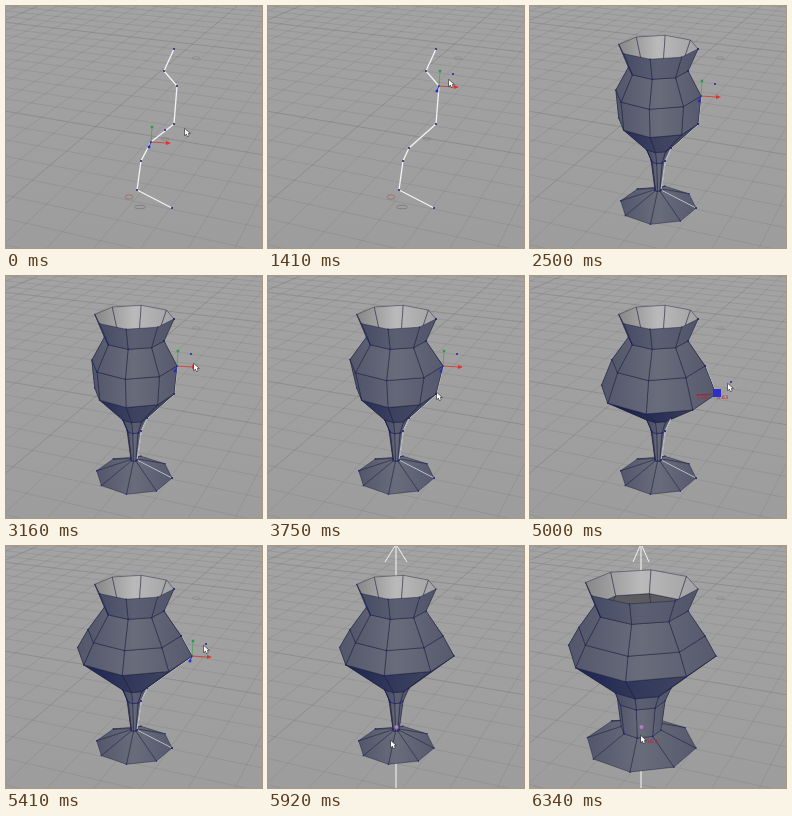
Write an HTML page with a canvas that moves like this. It is 256 by 242 pixels and loops after 6840 ms.

```html
<!DOCTYPE html>
<html lang="en">
<head>
<meta charset="utf-8">
<title>Lathe modelling</title>
<style>
html, body { margin: 0; width: 100%; height: 100%; overflow: hidden; background: #a0a0a0; }
canvas { display: block; }
</style>
</head>
<body>
<canvas id="view" width="256" height="242"></canvas>
<script>
const W = 256, H = 242, LOOP = 6840, STEP = 1000 / 12;
const SIDES = 8, TURN = 2 * Math.PI / SIDES, START = 0.19, DISTANCE = 800;
const SOLID = 2490, PICK_SHOULDER = 1240, PICK_BELLY = 3820, PICK_AXIS = 5650;
const ctx = document.getElementById('view').getContext('2d');

const ease = p => p * p * (3 - 2 * p);
const mix = (a, b, p) => a + (b - a) * p;

// Progress from 0 to 1 between two times.
const during = (t, from, to) => ease(Math.min(1, Math.max(0, (t - from) / (to - from))));

// The cursor goes from stop to stop: time, handle it is tied to, offset from it.
const STOPS = [
  [0, 4, 34, -13], [250, 4, 17, 1], [660, 4, 17, 1], [1000, 6, 4, -2],
  [1250, 2, 0, 0], [1410, 2, 10, -6], [1920, 2, 14, -6], [2000, 2, 28, 2],
  [2660, 2, 70, 10], [3160, 2, 17, -2], [3580, 2, 17, -2], [3750, 3, 1, -1],
  [4080, 3, 12, -10], [5500, 3, 12, -10], [5916, 8, -5, 13], [6000, 8, 0, 8], [LOOP, 8, 0, 8]
];

function handles(t) {
  const out = during(t, 4080, 4870), back = during(t, 4870, 5000), up = during(t, 5000, 5400);
  const axis = 128 - 30 * during(t, 5950, 6200) + 13 * during(t, 6200, 6333);
  const joint = during(t, 250, 700);
  return [
    [168, 43], [158, 65],
    [171 + 4 * during(t, 3160, 3580), 80 + 10 * during(t, 1580, 2000)],
    [168 + 25 * out - 7 * back, 118 + 4 * out - 4 * back - 8 * up],
    [145 - 4 * joint, 136 + 6 * joint],
    [135, 155], [131, 184], [166, 202],
    [axis, 182]
  ];
}

function cursorAt(t, pts) {
  const i = STOPS.findIndex(s => s[0] > t);
  const a = STOPS[i - 1], b = STOPS[i];
  const p = during(t, a[0], b[0]);
  return [0, 1].map(k => mix(pts[a[1]][k] + a[2 + k], pts[b[1]][k] + b[2 + k], p));
}

function path(points, close) {
  ctx.beginPath();
  points.forEach(p => ctx.lineTo(p[0], p[1]));
  if (close) ctx.closePath();
}

function line(points, color, width, close) {
  path(points, close);
  ctx.strokeStyle = color;
  ctx.lineWidth = width;
  ctx.stroke();
}

function dot([x, y], size, color) {
  ctx.fillStyle = color;
  ctx.fillRect(x - size / 2, y - size / 2, size, size);
}

function ring(x, y, rx, ry, color) {
  ctx.beginPath();
  ctx.ellipse(x, y, rx, ry, 0, 0, 7);
  ctx.strokeStyle = color;
  ctx.lineWidth = 0.7;
  ctx.stroke();
}

function gradient(x0, y0, x1, y1, colors) {
  const g = ctx.createLinearGradient(x0, y0, x1, y1);
  colors.forEach((c, i) => g.addColorStop(i / (colors.length - 1), c));
  return g;
}

// Two families of lines, each towards its own point on the horizon.
function floor() {
  ctx.fillStyle = gradient(0, 0, 0, H, ['#a3a3a3', '#9d9d9d']);
  ctx.fillRect(0, 0, W, H);
  const sky = -178, left = -1672, right = 440;
  const shade = n => `rgba(90,90,90,${n % 10 ? 0.2 : 0.36})`;
  for (let n = -12; n < 25; n++) {
    const y = sky + 1 / (1 / 305 + n * 15e-5);
    const slope = (y - sky) / (128 - left);
    line([[0, y - 128 * slope], [W, y + 128 * slope]], shade(n), 0.8);
  }
  for (let n = -20; n < 9; n++) {
    const x = -53 + n * 47;
    line([[mix(x, right, H / (H - sky)), 0], [x, H]], shade(n), 0.8);
  }
  ring(190, 52, 4, 1.3, 'rgba(90,90,95,.3)');
}

// One ring of the turned body, through the given spline point.
function turn([px, py], cx) {
  const d = px - cx;
  const r = d / (Math.cos(START) * (1 + d * Math.sin(START) / DISTANCE));
  const ry = r * mix(0.3, 0.5, (py - 41) / 157);
  const cy = py - ry * Math.sin(START);
  const pts = Array.from({ length: SIDES }, (_, i) => {
    const a = START + i * TURN, near = 1 + r * Math.sin(a) / DISTANCE;
    return [cx + r * near * Math.cos(a), cy + ry * near * Math.sin(a)];
  });
  return { r, cy, pts };
}

function skin(lean, cx, r) {
  const dark = Math.max(0, -lean) ** 2;
  const tone = (base, drop) => `rgb(${base.map((v, i) => Math.round(v - dark * drop[i]))})`;
  return gradient(cx - r, 0, cx + r, 0, [
    tone([82, 86, 107], [95, 85, 40]),
    tone([105, 108, 122], [85, 80, 50]),
    tone([87, 90, 110], [30, 28, 20])
  ]);
}

function isFront(q) {
  return q.reduce((sum, p, k) => {
    const n = q[(k + 1) % 4];
    return sum + p[0] * n[1] - n[0] * p[1];
  }, 0) < 0;
}

function lathe(profile, cx) {
  const rings = profile.map(p => turn(p, cx));
  const faces = [];
  for (let b = rings.length - 2; b >= 0; b--) {
    const top = rings[b], low = rings[b + 1];
    const dr = low.r - top.r, r = Math.max(low.r, top.r);
    const outer = skin(dr / Math.hypot(dr, low.cy - top.cy), cx, r);
    const inner = b ? '#5c5c60' : gradient(cx - r, 0, cx + r, 0, ['#858585', '#bababa', '#a2a2a4']);
    for (let i = 0; i < SIDES; i++) {
      const j = (i + 1) % SIDES;
      const q = [top.pts[i], top.pts[j], low.pts[j], low.pts[i]];
      const front = isFront(q);
      faces.push({ q, front, fill: front ? outer : inner });
    }
  }
  for (const side of [false, true]) {
    for (const { q, fill } of faces.filter(f => f.front === side)) {
      path(q, true);
      ctx.fillStyle = fill;
      ctx.fill();
      line(q, 'rgba(22,25,52,.72)', 0.6, true);
      if (side) q.forEach(p => dot(p, 1.2, 'rgba(35,38,150,.8)'));
    }
  }
}

function label(text, x, y) {
  ctx.font = '5px "DejaVu Sans", sans-serif';
  ctx.fillStyle = '#b8222c';
  ctx.fillText(text, x, y);
}

function gizmo([x, y]) {
  line([[x, y], [x + 1, y - 14]], 'rgba(50,160,70,.75)', 0.8);
  line([[x, y], [x + 15, y + 1]], '#c84b40', 1);
  line([[x, y], [x - 2, y + 5]], '#2233cc', 1);
  dot([x + 1, y - 15], 2.4, '#2a9a48');
  dot([x - 2, y + 5], 2.6, '#1c2fd0');
  dot([x + 14, y - 12], 2, '#3a3fb0');
  path([[x + 15, y - 1], [x + 20, y + 1], [x + 15, y + 3]]);
  ctx.fillStyle = '#d8352c';
  ctx.fill();
}

function dragBox([x, y]) {
  line([[x - 20, y + 1], [x - 4, y]], '#8c2634', 0.8);
  dot([x + 1, y - 1], 8, '#2a2fd0');
  label('1.08', x - 19, y + 5);
  label('0.63', x + 1, y + 5);
  dot([x + 15, y - 12], 2, '#3a3fb0');
}

function cursor([x, y]) {
  const shape = [[0, 0], [0, 6], [1.5, 4.8], [2.7, 7.2], [3.8, 6.6], [2.8, 4.3], [4.6, 4.2]];
  line(shape.map(p => [x + p[0], y + p[1]]), '#333', 1.1, true);
  ctx.fillStyle = '#fff';
  ctx.fill();
}

function axisLine(cx) {
  const spread = cx > 120 ? 11 : 8;
  line([[cx, 0], [cx, H]], '#f2f2f2', 1.1);
  for (const s of [-1, 1]) line([[cx + s * spread, 16], [cx + s, 0]], '#f2f2f2', 1);
}

function draw(t) {
  const pts = handles(t), profile = pts.slice(0, 8), cx = pts[8][0];
  const axisOn = t >= 5820, splineOn = t < PICK_AXIS;
  floor();
  if (axisOn) axisLine(cx);
  if (t >= SOLID) {
    if (splineOn) line(profile.slice(2), '#f0f1f4', 1.5);
    lathe(profile, cx);
    if (splineOn) line(profile.slice(4), '#e4e6ec', 0.8);
  } else {
    ring(123, 191, 4, 2.2, 'rgba(150,80,75,.7)');
    ring(134, 201, 5.5, 1.8, 'rgba(85,85,110,.6)');
    ring(159, 133, 4, 1.2, 'rgba(90,90,95,.4)');
    line(profile, '#f4f4f4', 1.3);
  }
  if (splineOn) {
    profile.forEach(p => dot(p, 1.8, '#26266e'));
    if (t >= 4160 && t < 5400) dragBox(profile[3]);
    else gizmo(profile[t < PICK_SHOULDER ? 4 : t < PICK_BELLY ? 2 : 3]);
  }
  if (axisOn) {
    ctx.fillStyle = '#b27ac8';
    ctx.beginPath();
    ctx.arc(cx + 0.5, 181, 2, 0, 7);
    ctx.fill();
    if (t > 5990) label('-16.4', cx + 4, 197);
  }
  if (t < 1990 || t > 2660) cursor(cursorAt(t, pts));
}

function frame(now) {
  const step = Math.floor((now % LOOP + 7) / STEP);
  draw(Math.min(76, step) * STEP);
  requestAnimationFrame(frame);
}
draw(0);
requestAnimationFrame(frame);
</script>
</body>
</html>
```
